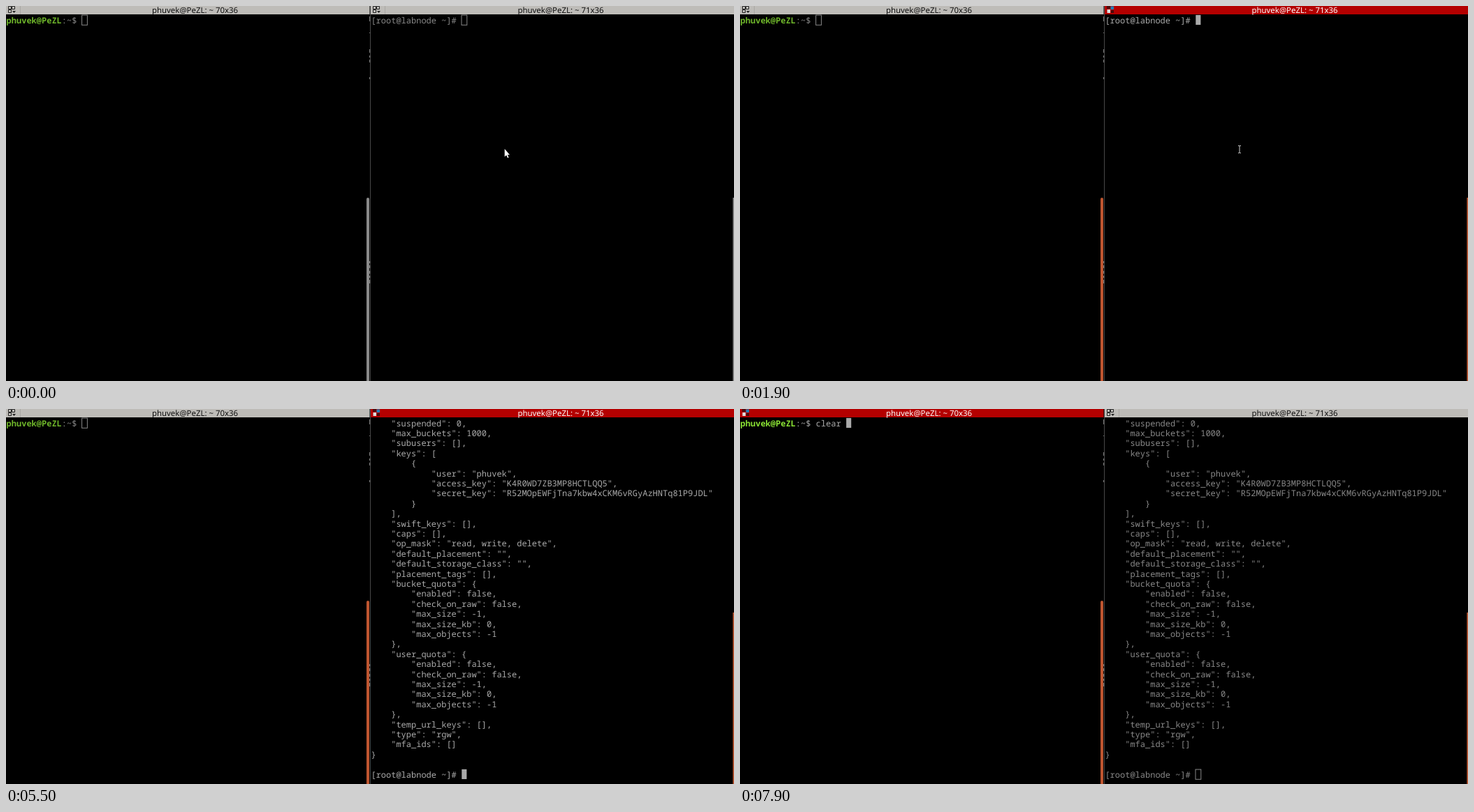
These frames come from a looping animation (1042 by 538 pixels, 8 s). An HTML page:

```html
<!DOCTYPE html>
<html lang="en">
<head>
<meta charset="utf-8">
<title>Split terminal</title>
<style>
html, body { margin: 0; width: 100%; height: 100%; overflow: hidden; background: #000; }
svg { display: block; width: 1042px; height: 538px; }
text { white-space: pre; text-rendering: geometricPrecision; }
.pane { font: 12px "Noto Sans Mono", monospace; fill: #888; }
.pane.active { fill: #aaa; }
.user { font-weight: bold; fill: #6eb52a; }
.active .user { fill: #8ae234; }
.bar { fill: #bebcb8; }
.active .bar { fill: #b40000; }
.title { font: 11.4px "Noto Sans", sans-serif; text-anchor: middle; fill: #111; }
.active .title { fill: #fff; }
.idle-icon { fill: none; stroke: #222; }
.active .idle-icon, .live-icon { display: none; }
.active .live-icon { display: inline; }
.caret { fill: none; stroke: #888; }
.active .caret { fill: #aaa; stroke: none; }
.thumb { fill: #8a8a8a; }
.warm .thumb { fill: #bf5630; }
</style>
</head>
<body>
<svg id="stage" viewBox="0 0 1042 538">
  <defs>
    <g id="idle">
      <path d="M3.5 .5h4v4h-4zM8.5 .5h4v4h-4zM3.5 5.5h4v4h-4z"/>
      <path d="M9 7h5l-2.5 3z" fill="#222" stroke="none"/>
      <path d="M20.5 0v12" stroke="#aaa8a4"/>
    </g>
    <g id="live">
      <path d="M3 0h5v4h-5zM9 6h4v4h-4z" fill="#4a0a0a"/>
      <path d="M8.5 .5h4.5v4.5h-4.5z" fill="#2080b8"/>
      <path d="M3.5 5h4.5v5h-4.5z" fill="#ddd"/>
    </g>
  </defs>
  <rect width="1042" height="538"/>
  <path d="M521.5 0V538" stroke="#484848"/>
  <path d="M520.5 15v7m0 16v1m0 23v5m0 4v3m0 3v4m0 21v3m0 261v3m0 3v4m0 4v4m0 3v3m0 3v5" stroke="#777"/>
  <g id="thumbs">
    <path class="thumb" d="M516 538V277q0-2 2-2t2 2V538z"/>
    <rect id="rightThumb" class="thumb" x="1040.4" width="1.6" height="270"/>
  </g>
  <path id="arrow" d="M713.7 205v11.3l2.5-2.3 1.8 4 1.6-.7-1.8-3.9h3.2z" fill="#fff"/>
  <path id="beam" d="M-2 -5.2h1.5l.5.5.5-.5h1.5M0 -5V5M-2 5.2h1.5l.5-.5.5.5h1.5" fill="none" stroke="#d0d0d0"/>
</svg>
<script>
const LOOP = 8000, CELL = 7.2, ROW = 14.4, TOP = 12.6;
const USER = "phuvek", HOST = "PeZL";
const PROMPT = "[root@labnode ~]# ";
const COMMAND = `radosgw-admin user info --uid=${USER}`;
const quota = name => `    "${name}": {
        "enabled": false,
        "check_on_raw": false,
        "max_size": -1,
        "max_size_kb": 0,
        "max_objects": -1
    },`;
const OUTPUT = `    "suspended": 0,
    "max_buckets": 1000,
    "subusers": [],
    "keys": [
        {
            "user": "${USER}",
            "access_key": "K4R0WD7ZB3MP8HCTLQQ5",
            "secret_key": "R52MOpEWFjTna7kbw4xCKM6vRGyAzHNTq81PV9JDL"
        }
    ],
    "swift_keys": [],
    "caps": [],
    "op_mask": "read, write, delete",
    "default_placement": "",
    "default_storage_class": "",
    "placement_tags": [],
${quota("bucket_quota")}
${quota("user_quota")}
    "temp_url_keys": [],
    "type": "rgw",
    "mfa_ids": []
}

${PROMPT}`.replace("VR9JDL", "").replace("PV9JDL", "P9JDL").split("\n");

const $ = id => document.getElementById(id);
const stage = $("stage");

function add(parent, tag, attrs, content = "") {
  const el = document.createElementNS("http://www.w3.org/2000/svg", tag);
  for (const key in attrs) el.setAttribute(key, attrs[key]);
  el.textContent = content;
  return parent.appendChild(el);
}

function makePane(left, start, width, title, titleX) {
  const group = add(stage, "g", { class: "pane" });
  add(group, "rect", { class: "bar", x: left, width, height: 12 });
  add(group, "text", { class: "title", x: titleX, y: 9.6 }, title);
  for (const icon of ["idle", "live"])
    add(group, "use", { class: icon + "-icon", href: "#" + icon, x: left });
  const body = add(group, "g", {});
  const caret = add(group, "rect", { class: "caret" });
  let shown;
  return {
    write(lines) {
      const key = lines.join("\n");
      if (key === shown) return;
      shown = key;
      body.textContent = "";
      lines.forEach((line, row) =>
        add(body, "text", { x: start, y: TOP + row * ROW + 12 }, line));
    },
    focus(active) { group.classList.toggle("active", active); },
    // A focused caret fills its cell, an unfocused one is outlined.
    caret(col, row, active, visible) {
      const inset = active ? 0.3 : 0.5;
      const box = {
        x: start + col * CELL - (active ? 0 : 0.5) + inset,
        y: TOP + row * ROW + inset,
        width: active ? 7.1 : 7.8,
        height: active ? 14.1 : 14.2
      };
      for (const key in box) caret.setAttribute(key, box[key]);
      caret.style.display = visible ? "" : "none";
    },
    body
  };
}

const left = makePane(0, 0.6, 520.5, `${USER}@${HOST}: ~ 70x36`, 270.5);
const right = makePane(522, 522.4, 520, `${USER}@${HOST}: ~ 71x36`, 794);
const prompt = add(stage, "text", { x: 0.6, y: TOP + 12 });
add(prompt, "tspan", { class: "user" }, `${USER}@${HOST}`);
const typed = add(prompt, "tspan", {});
left.body.appendChild(prompt);
stage.append($("arrow"), $("beam"));

const within = (t, ...spans) => spans.some(([from, to]) => t >= from && t < to);
const show = (el, visible) => { el.style.display = visible ? "" : "none"; };

// [time, x, y] for each jump of the text pointer; no position hides it
const POINTER = [[0], [400, 715, 205.7], [3500], [6700, 715, 205.7],
  [6900, 714, 205.7], [7100, 376, 205.7], [7200, 230.5, 190], [7500, 232, 189.7], [7700]];

function render(t) {
  const leftActive = within(t, [600, 700], [7200, LOOP]);
  const rightActive = within(t, [700, 7200]);
  left.focus(leftActive);
  right.focus(rightActive);
  $("thumbs").classList.toggle("warm", t >= 700);
  $("rightThumb").setAttribute("y", t < 5500 ? 275 : 292);

  const leftInput = t < 7900 ? "" : "clear ";
  typed.textContent = ":~$ " + leftInput;
  left.caret(15 + leftInput.length, 0, leftActive, true);

  const input = t < 4100 ? "" : t < 4500 ? "clear " : COMMAND;
  right.write(t < 5500 ? [PROMPT + input] : OUTPUT);
  const col = within(t, [5200, 5500]) ? 0 : PROMPT.length + (t < 5500 ? input.length : 0);
  const row = t < 5200 ? 0 : t < 5500 ? 1 : 35;
  const blinkedOff = within(t, [1300, 1900], [2500, 3200], [4000, 4100],
    [4700, 4900], [6000, 6200], [6800, 7200]);
  right.caret(col, row, rightActive, !blinkedOff);

  show($("arrow"), t < 400);
  const [, x, y] = POINTER.findLast(([time]) => t >= time);
  show($("beam"), x !== undefined);
  if (x !== undefined) $("beam").setAttribute("transform", `translate(${x} ${y})`);
}

const begin = performance.now();
function tick() {
  render((performance.now() - begin) % LOOP);
  requestAnimationFrame(tick);
}
tick();
</script>
</body>
</html>
```
